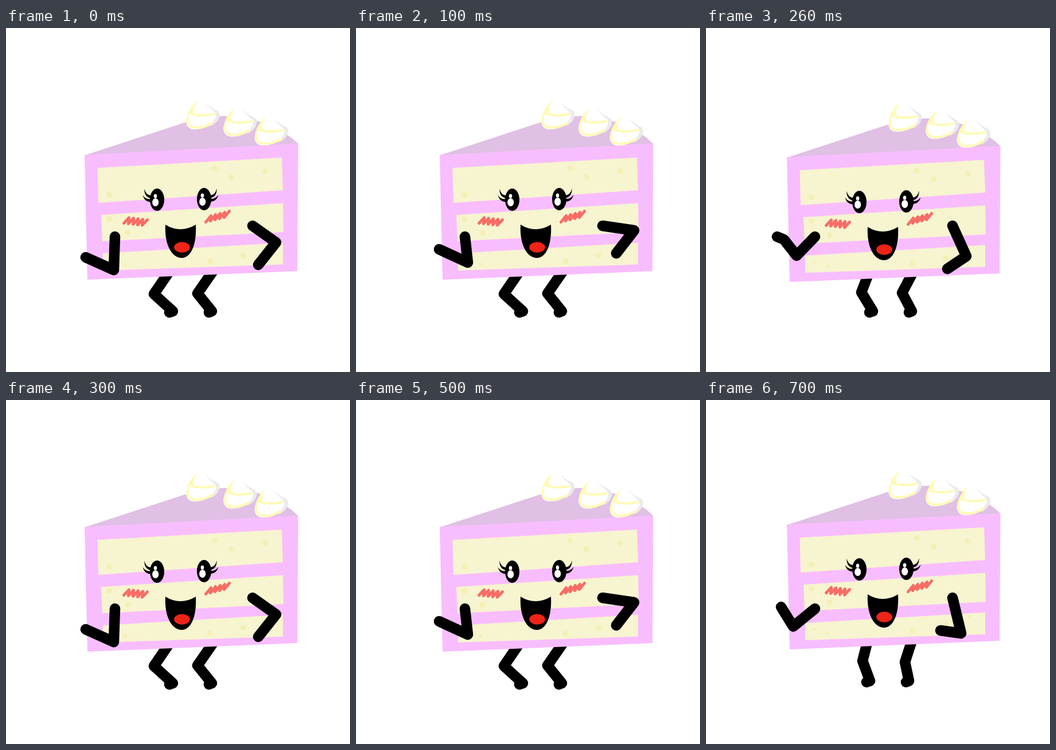
Animation, 600 px wide and 600 px high, one loop 800 ms. Source, as an HTML page:

```html
<!DOCTYPE html>
<html lang="en">
<head>
<meta charset="utf-8">
<title>Dancing cake slice</title>
<style>
  html, body { margin: 0; width: 100%; height: 100%; overflow: hidden; background: #fff; }
  svg { display: block; width: 100%; height: 100%; }
  .line { fill: none; stroke-linecap: round; stroke-linejoin: round; }
  .limb { stroke: #000; stroke-width: 18.5px; }
  .cake, .arms, .legs { animation: sway 800ms step-end infinite; }
  .arms { animation-name: arms; }
  .legs { animation-name: legs; }

  /* Four held poses: left, right, dip, hop */
  @keyframes sway {
    0%, 37.5% { transform: none; }
    12.5%, 62.5% { transform: translate(9px, 0); }
    25%, 75% { transform: translate(4px, 4px); }
    87.5%, 100% { transform: translate(4px, -4px); }
  }
  /* Hand, elbow, shoulder, then shoulder, elbow, hand */
  @keyframes arms {
    0%, 37.5% { d: path("M139 400 L188 422 L190 364 M430 345 L471 374 L440 413"); }
    12.5%, 62.5% { d: path("M145 386 L195 409 L190 364 M430 345 L485 353 L454 393"); }
    25%, 75% { d: path("M124 364 L136 369 L158 397 L190 364 M430 345 L454 398 L421 420"); }
    87.5%, 100% { d: path("M131 361 L152 395 L190 364 M430 345 L445 407 L409 402"); }
  }
  /* Hip, knee, heel, toe of each leg */
  @keyframes legs {
    0%, 12.5%, 37.5%, 62.5% { d: path("M284 426 L258 464 L291 494 L285 496 M361 424 L334 463 L359 494 L354 496"); }
    25%, 75% { d: path("M284 427 L271 461 L291 494 L285 496 M361 426 L342 462 L359 494 L354 496"); }
    87.5%, 100% { d: path("M282 420 L273 455 L286 490 L280 492 M360 417 L347 457 L354 490 L349 492"); }
  }
</style>
</head>
<body>
<svg viewBox="0 0 600 600">
  <defs>
    <g id="cream">
      <path fill="#ebebeb" d="M341 122 Q350 136 370 145 Q376 152 368 163 Q362 170 355 171Z"/>
      <path fill="#fff" d="M341 121 Q315 143 314 163 Q315 177 330 177 Q357 176 366 155 Q367 148 361 144 Q350 135 341 121Z"/>
      <path fill="#fffab5" d="M334 127 Q315 142 315 163 L319 152 L328 147 Q325 140 334 127Z"/>
      <path class="line" stroke="#fffab5" stroke-width="4" d="M317 157 Q314 173 331 174 Q347 174 359 166 M321 148 Q336 156 363 150"/>
    </g>
    <g id="eye">
      <ellipse rx="12.5" ry="19.5"/>
      <ellipse cx="-2.8" cy="4.5" rx="5.6" ry="7" fill="#fff"/>
      <ellipse cx="-3" cy="-6.3" rx="2.8" ry="3.6" fill="#fff"/>
    </g>
    <path id="lashes" d="M-22 -19 Q-20 -8 -10 -7 L-10 -2 Q-23 -5 -22 -19Z M-25 -8 Q-20 0 -10 -1 L-10 4 Q-22 4 -25 -8Z"/>
  </defs>

  <path class="line limb legs"/>

  <g class="cake">
    <path fill="#e0c0e4" d="M137 222 L316 163.5 Q365 150 396 154.5 Q470 162 509.5 202Z"/>
    <path fill="#f8bdff" d="M137 221.5 L509.5 201.5 L508 424 L142 439Z"/>
    <path fill="#f7f4d0" d="M159.5 244 L481 226 L483 283 L161 305Z M166 326 L483 305.5 L484 356 L168 372Z M169 393 L483 374.5 L483 412.5 L169 423Z"/>
    <path class="line" stroke="#f4f0b4" stroke-width="10" d="M364 245h0M393 260h0M452 250h0M180 291h0M180 333h0M212 357h0M356 407h0M414 397h0"/>
    <path class="line" stroke="#f4f0b4" stroke-width="6" d="M454 382h0M208 412h0M185 404h0"/>

    <use href="#cream"/>
    <use href="#cream" x="65" y="12.5"/>
    <use href="#cream" x="119.5" y="28"/>

    <use href="#eye" x="263.5" y="299.5"/>
    <use href="#eye" x="345.5" y="298.5"/>
    <use href="#lashes" x="263.5" y="299.5"/>
    <use href="#lashes" transform="translate(345.5 299) scale(-1 1)"/>

    <path id="blush" class="line" stroke="#f76d66" stroke-width="5"/>

    <path d="M278 343 Q304 359 331 343 C333 379 322 401 306.5 401 C290 401 276 379 278 343Z"/>
    <ellipse cx="307" cy="382.5" rx="13.8" ry="9.2" fill="#ee2417"/>
  </g>

  <path class="line limb arms"/>
</svg>
<script>
  // Slanted zigzag around a centre; tilt is the rise from left to right
  function scribble(cx, cy, tilt, turns = 9) {
    const points = Array.from({ length: turns + 1 }, (_, i) => {
      const along = i / turns - 0.5;
      const side = i % 2 ? 1 : -1;
      return `${cx + along * 36 + side * 2.5} ${cy - along * tilt - side * 5}`;
    });
    return "M" + points.join(" L");
  }
  document.getElementById("blush").setAttribute("d",
    scribble(226, 337.5, -4) + scribble(369, 329, 9));
</script>
</body>
</html>
```
